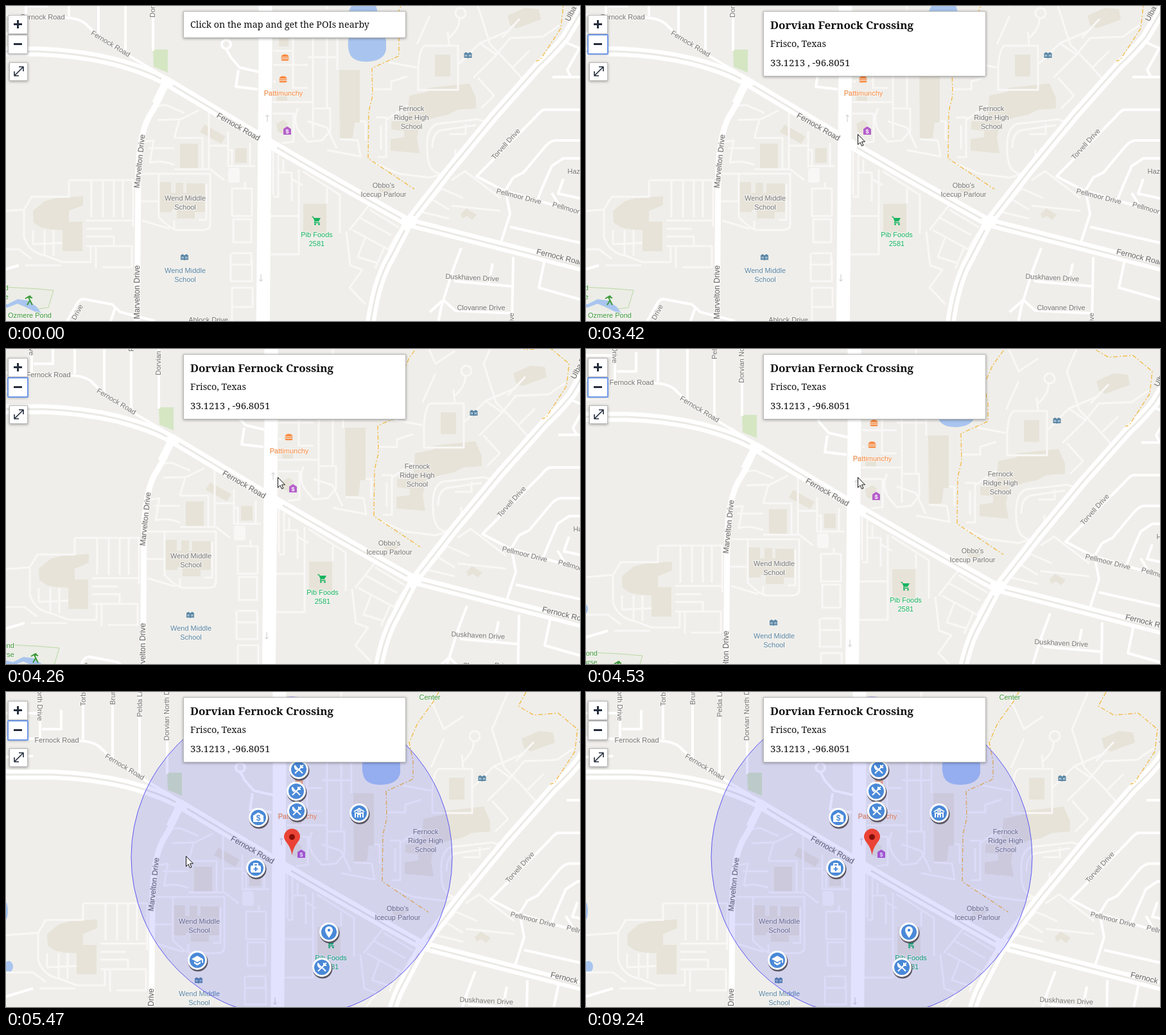
An HTML page for the animation above (9.34 s loop, 894 px wide and 492 px high).

```html
<!DOCTYPE html>
<html lang="en">
<head>
<meta charset="utf-8">
<title>POI map</title>
<style>
html, body { margin: 0; width: 100%; height: 100%; overflow: hidden; background: #efeeea; }
svg { display: block; }
path, circle { stroke-linejoin: round; }
.line { fill: none; }
.service { stroke: #f9f8f7; stroke-width: 3; }
.street { stroke: #fff; stroke-width: 4; }
.avenue { stroke: #fff; stroke-width: 9; }
.dual { stroke: #fff; stroke-width: 15.5; }
.median { stroke: #eae9e5; stroke-width: 2.8; }
.trail { stroke: #f3bc4b; stroke-width: 1.4; stroke-dasharray: 7 3 2 3; }
.building { fill: #e7e3d8; }
.water { fill: #a9c5ef; }
.park { fill: #d5e6c3; }
.label { font: 11px "Liberation Sans", Arial, sans-serif; text-anchor: middle; fill: #777;
  paint-order: stroke; stroke: #f4f3f0; stroke-width: 2.5px; stroke-linejoin: round; }
.big { font-size: 12px; fill: #666; }
.panel { font: 14.25px "Noto Serif", serif; fill: #111; }
.panel .title { font-size: 17px; font-weight: bold; }
.panel .coords { font-size: 15px; }
.box { fill: #fff; stroke: #bbb; filter: drop-shadow(0 1px 2px rgba(0,0,0,.35)); }
.sign { fill: none; stroke: #252d3c; stroke-width: 3; }
.glyph { fill: none; stroke: #fff; stroke-width: 2; }

.anim { animation: 9340ms step-end infinite; }
#map { animation-name: pan; }
#cursor { animation-name: cursor; }
#focus { animation-name: focus; }
#results { animation-name: results; }
#hint { animation-name: hint; }
#details { animation-name: details; }
@keyframes pan {
  0% { transform: translate(0, 0); }
  39.82% { transform: translate(1px, 1px); }
  41.11% { transform: translate(2px, 5px); }
  42.71% { transform: translate(5px, 11px); }
  44% { transform: translate(7px, 17px); }
  45.6% { transform: translate(9px, 23px); }
  46.89% { transform: translate(11px, 29px); }
  48.5% { transform: translate(14px, 35px); }
  49.89% { transform: translate(16px, 40px); }
  51.49% { transform: translate(18px, 45px); }
  52.89% { transform: translate(19px, 50px); }
  54.38% { transform: translate(21px, 54px); }
  55.67% { transform: translate(22px, 56px); }
  56.95%, 100% { transform: translate(22px, 58px); }
}
@keyframes cursor {
  0% { transform: translate(900px, 240px); }
  13.59% { transform: translate(800px, 240px); }
  15.2% { transform: translate(664px, 235px); }
  16.91% { transform: translate(554px, 236px); }
  18.52% { transform: translate(507px, 227px); }
  19.8% { transform: translate(472px, 218px); }
  21.41% { transform: translate(449px, 209px); }
  22.69% { transform: translate(434px, 205px); }
  23.98% { transform: translate(428px, 203px); }
  25.58% { transform: translate(425px, 201px); }
  26.87% { transform: translate(423px, 200px); }
  58.56% { transform: translate(280px, 256px); }
  78.58% { transform: translate(289px, 272px); }
  80.19% { transform: translate(341px, 306px); }
  81.58% { transform: translate(414px, 344px); }
  83.19% { transform: translate(560px, 372px); }
  84.47% { transform: translate(725px, 396px); }
  85.76% { transform: translate(856px, 413px); }
  87.36% { transform: translate(876px, 426px); }
  88.75% { transform: translate(886px, 435px); }
  90.36% { transform: translate(888px, 441px); }
  91.97% { transform: translate(889px, 455px); }
  93.36% { transform: translate(891px, 473px); }
  94.64%, 100% { transform: translate(900px, 500px); }
}
@keyframes focus { 0%, 98.92%, 100% { opacity: 0; } 29.55% { opacity: 1; } }
@keyframes results { 0% { opacity: 0; } 58.56%, 100% { opacity: 1; } }
@keyframes hint { 0% { opacity: 1; } 36.61%, 100% { opacity: 0; } }
@keyframes details { 0% { opacity: 0; } 36.61%, 100% { opacity: 1; } }
</style>
</head>
<body>
<svg width="894" height="492" viewBox="0 0 894 492">
<defs>
  <g id="burger" fill="#fa8a40">
    <path d="M-6,-1Q-5,-5 0,-5T6,-1Z"/><path d="M-6,0H6V1.5H-6ZM-6,2.5H6Q6,5 4,5H-4Q-6,5 -6,2.5Z"/>
  </g>
  <g id="book" fill="#5a86a5">
    <path d="M-6,-3L-3,-5 0,-3 3,-5 6,-3V4H1L0,5 -1,4H-6Z"/>
    <path d="M-4,-1V2M-2,-1V2M2,-1V2M4,-1V2" stroke="#dfe8ee"/>
  </g>
  <g id="disc">
    <circle cx="1" cy="2" r="15.5" fill="#5a5663"/><circle r="15" fill="#fff"/><circle r="12" fill="#4a89d8"/>
  </g>
  <g id="food">
    <use href="#disc"/>
    <path class="glyph" d="M-6,6L3,-3M3,-3L3,-7M3,-3L7,-3M4,-4L7,-7M6,6L-1,-1M-2,-1L-6,-6Q-7,-3 -4,0Z"/>
  </g>
  <path id="arrow" d="M0,6V-5M-2.5,-2L0,-5 2.5,-2" class="line" stroke="#c9c9c9"/>
</defs>

<g id="map" class="anim">
  <rect x="-60" y="-80" width="1020" height="620" fill="#efeeea"/>

  <g class="park">
    <path d="M229,68H252V104L230,95Z"/>
    <path d="M-25,440L40,441 74,444 66,470 35,478 -25,470Z" opacity=".12"/>
  </g>
  <path d="M-25,438L38,441 74,444 66,471 45,474" class="line" stroke="#b9d8a2"/>
  <g class="water">
    <path d="M556,-12Q574,-12 578,6L592,54V68Q589,86 562,87Q540,87 535,74Q531,62 534,48V8Q540,-8 556,-12Z"/>
    <path d="M-25,460L2,466 18,458 34,460 48,470 55,480 44,477 30,470 18,465 2,471 -25,467Z"/>
    <ellipse cx="-18" cy="371" rx="7" ry="9"/><ellipse cx="-23" cy="284" rx="4" ry="14"/>
  </g>

  <g class="building">
    <path d="M519,100H551V182H543L540,206 520,208Z"/>
    <path d="M668,76H692V110H668ZM781,15L808,3 830,5 833,21 795,35 785,30Z"/>
    <path d="M628,140L657,134V128L722,121 732,144V160L704,162 688,170 668,174 645,182 640,206 644,230 599,226V208L620,205V195L600,193V180L625,180Z"/>
    <path d="M271,215H299V254H271ZM357,222H375V245H357ZM309,185L342,204 335,215 302,197Z"/>
    <path d="M238,275H257V292H264V276H276V292H281V277H310V322H294V332H266V318H258V322H238Z"/>
    <path d="M42,320L60,305 78,300 120,297V311L98,320V337H119V383H88V350L70,349 55,346 43,338Z"/>
    <path d="M463,309H499V358H463ZM708,325L717,316 733,326 726,334 718,328 711,332Z"/>
    <path d="M425,47H440V63H425ZM421,141L438,134V150H422ZM421,184L432,178 439,183 432,200 423,196Z"/>
    <path d="M582,279L593,276 604,284 592,295 580,288Z"/>
  </g>

  <g class="line service">
    <path d="M99,272H198V345M133,272V330M151,272V330M168,272V330M182,272V330M125,335H198M125,348H165M125,360H168V375H125M28,318L40,298H98V272M-25,322L28,318V360Q35,385 62,390L88,400H132V375H196V408H150M42,350V372L88,370M60,350V390M74,350V390M30,405H86M140,375V410M-25,380H20L40,395"/>
    <path d="M228,165Q235,153 250,155L278,167M236,178L272,177 300,163M216,212L230,210 224,245M262,255H316V165M262,206H306V255M224,245Q240,240 262,248M262,206L270,178M316,218H346M346,196V250H388M380,214V250M346,225H352V250M222,222H262M318,255L340,272"/>
    <path d="M212,262H318V341Q318,350 305,350H266Q256,348 238,330V262M312,278V334H300M262,335V350M210,305H238M212,335L255,348"/>
    <path d="M352,285H383V328H352ZM354,333H382V369H354ZM352,386H382V404H350V386M350,404V430H383V395M352,440H384V470H352ZM352,470V492M372,275V285"/>
    <path d="M447,50V128H470M416,70H447M416,92H470M478,50V205M500,50V160M416,118H420M470,80H516M516,50V100M415,150H478V128M455,160Q445,180 458,198L470,212 492,210 505,195V160H478M415,168H448V212L430,214M470,180L500,190 515,222M520,208L548,210 552,235 500,225M551,180H560V210"/>
    <path d="M416,224V295M424,232V298H416M424,260H445V305M432,240V260M456,255V388H412M412,328H456M462,258L520,295V355M445,270L462,280M500,285V308"/>
    <path d="M535,350L568,308M530,352L536,405 555,412 535,440 560,466M540,350L595,380 610,355M566,318L612,346M550,330L600,358M560,360L548,392 580,402M590,375L575,410M640,320L690,332M640,330L678,285 712,300M660,300L690,318"/>
    <path d="M642,96V131H704V62H652Q644,66 642,96M704,92L738,58 764,76 728,112M738,58L785,38M690,60L688,40M568,130H600V118L625,110M576,174H592V236H578M584,186V224M592,178L625,155M576,246L612,262 660,268 680,262"/>
    <path d="M656,225Q654,190 672,184L735,177 757,184 706,248Q694,262 675,262Q656,258 656,225ZM664,222Q664,198 678,194L732,186M700,224V242M716,184V200H690M754,60L785,92 806,116M772,50L800,20M762,78L785,50 836,48 862,30M790,95L815,70M735,112L760,140 740,160M596,88L640,96"/>
    <path d="M694,272L715,258 770,300M770,320L694,312M640,-45L660,0 690,-20M690,50Q708,34 706,18M500,-58V5M660,15L640,60M760,-58L735,0 754,60"/>
    <circle cx="708" cy="11" r="8"/>
  </g>

  <g class="line street">
    <path d="M-30,13L90,18Q118,19 128,32Q145,48 175,68L236,104M31,-60V14M64,-30V0H34M98,-60V16M144,-60V44M186,-60V76M229,-60V70M-30,44L20,42M-30,-25H31"/>
    <path d="M343,67L350,80 364,96 394,103M362,100L358,126 392,130"/><circle cx="343" cy="60" r="7"/>
    <path d="M894,162H838Q832,164 824,174L733,266 775,288 910,328M930,210H854Q845,212 836,224L806,260 790,268M790,268L778,288M910,238H868L850,250 836,282 828,302M868,270L860,293 910,304M862,312L850,292M851,111H930M930,62L893,66 874,100 880,111M868,55L893,66"/>
    <path d="M778,288L785,325 770,372M785,345L930,378M709,378L694,418 678,470 672,500M694,415L700,430 790,438M758,402L752,434M790,392L788,500M681,459L700,476 790,480M660,478L680,460M840,392L830,440 900,460"/>
    <path d="M92,498L108,470Q114,456 122,458L165,466 178,478 232,492M170,472L160,500M-30,420L20,405"/>
  </g>

  <path class="line avenue" d="M250,118Q240,146 222,174Q207,205 206,260L204,520"/>
  <path class="line" stroke="#fff" stroke-width="12" d="M251,116L233,152"/>
  <path class="line" stroke="#fff" stroke-width="21" d="M404,-80V90L400,520"/>
  <g class="line dual">
    <path d="M-40,71L50,71Q110,73 165,86Q215,99 250,118L410,214Q510,273 627,338L930,416"/>
    <path d="M915,-25L872,48Q852,73 830,93L760,172 690,257 627,338 598,394Q574,435 566,510"/>
  </g>
  <g class="line median">
    <path d="M-40,71L50,71Q110,73 165,86Q215,99 242,114M260,124L390,202M422,221Q510,273 616,332M638,341L930,416"/>
    <path d="M915,-25L872,48Q852,73 830,93L760,172 690,257 635,328M621,350L598,394Q574,435 566,510"/>
  </g>
  <rect x="346" y="253" width="18" height="23" rx="4" fill="#f8f7f6"/>

  <g class="line trail">
    <path d="M652,-58L643,-42 619,-9 606,21 612,50V78L570,97 571,140 565,165 564,238 636,286"/>
    <path d="M788,-58L776,-36 800,-22 838,-25 868,0 864,35 832,84 826,86"/>
  </g>
  <use href="#arrow" x="407" y="175"/>
  <use href="#arrow" transform="translate(397 425) rotate(180)"/>

  <g class="label">
    <text x="57" y="21">Fernock Road</text>
    <text transform="translate(161 62) rotate(31)">Fernock Road</text>
    <text transform="translate(360 192) rotate(30)" class="big">Fernock Road</text>
    <text transform="translate(862 396) rotate(14)" class="big">Fernock Road</text>
    <text transform="translate(212 243) rotate(-84)" class="big">Marvelton Drive</text>
    <text transform="translate(208 447) rotate(-90)" class="big">Marvelton Drive</text>
    <text transform="translate(883 14) rotate(-63)" class="big" style="text-anchor:start" dx="-12">Ulba Drive</text>
    <text transform="translate(781 218) rotate(-48)">Torvell Drive</text>
    <text transform="translate(798 301) rotate(14)">Pellmoor Drive</text>
    <text transform="translate(885 323) rotate(16)">Pellmoor Drive</text>
    <text transform="translate(726 428) rotate(3)">Duskhaven Drive</text>
    <text x="740" y="475">Clovanne Drive</text>
    <text x="315" y="494">Ablock Drive</text>
    <text transform="translate(110 488) rotate(-62)">Elk Drive</text>
    <text transform="translate(791 492) rotate(-90)">Drive</text>
    <text x="898" y="262">Haz Lane</text>
    <g style="text-anchor:start">
      <text transform="translate(232 18) rotate(-90)">Dorvian North Drive</text>
      <text transform="translate(190 -19) rotate(-90)">Pelda Lane</text>
      <text transform="translate(148 -38) rotate(-90)">Brum Lane</text>
      <text transform="translate(102 -36) rotate(-90)">Torba Lane</text>
    </g>
    <text transform="translate(27 -13) rotate(90)" style="text-anchor:end">North Drive</text>
    <text x="631.5" y="164">Fernock<tspan x="631.5" dy="14">Ridge High</tspan><tspan x="631.5" dy="14">School</tspan></text>
    <text x="279" y="304">Wend Middle<tspan x="279" dy="14">School</tspan></text>
    <text x="588" y="284">Obbo's<tspan x="588" dy="14">Icecup Parlour</tspan></text>
    <text x="279" y="417" fill="#5a86a5">Wend Middle<tspan x="279" dy="14">School</tspan></text>
    <text x="432" y="140" fill="#fa8a40">Pattimunchy</text>
    <text x="484" y="361" fill="#16b45f">Pib Foods<tspan x="484" dy="14">2581</tspan></text>
    <g fill="#3f9a3c">
      <text x="37" y="487">Ozmere Pond</text>
      <text x="638" y="-46">Center</text>
      <text x="4" y="444" style="text-anchor:end">Pond<tspan x="4" dy="14">Course</tspan></text>
    </g>
  </g>

  <use href="#burger" x="434.5" y="80.5"/><use href="#burger" x="431.5" y="114.5"/>
  <use href="#book" x="719.5" y="77"/><use href="#book" x="278" y="392.5"/>
  <path d="M432,192L438,188 444,192V201H432Z" fill="#b55fca"/>
  <text x="438" y="198.5" fill="#fff" text-anchor="middle" font-family="Liberation Sans, sans-serif" font-size="9" font-weight="bold">$</text>
  <g fill="#16b45f">
    <path d="M479,331H490L487,336.5H481Z"/>
    <path d="M476.5,329.5H478.5L481.5,336 480.5,338.5H488.5" class="line" stroke="#16b45f" stroke-width="1.3"/>
    <circle cx="481.5" cy="341" r="1.4"/><circle cx="487.5" cy="341" r="1.4"/>
  </g>
  <path d="M30,457L35,454 41,456M35,455L38,461 41,467M37,460L33,467" class="line" stroke="#3f9a3c" stroke-width="2"/>
  <circle cx="37" cy="454" r="2" fill="#3f9a3c"/>
</g>

<g id="results" class="anim">
  <circle cx="445" cy="258" r="250" fill="#00f" fill-opacity=".115" stroke="#5c55f0"/>
  <use href="#food" x="456" y="121"/><use href="#food" x="452" y="155"/>
  <use href="#food" x="453" y="186"/><use href="#food" x="492" y="430"/>
  <g transform="translate(393 196)">
    <use href="#disc"/><path d="M-8,-3L0,-8 8,-3V7H-8Z" fill="#fff"/>
    <text y="5" fill="#4a89d8" text-anchor="middle" font-family="Liberation Sans, sans-serif" font-size="12" font-weight="bold">$</text>
  </g>
  <g transform="translate(550 189)">
    <use href="#disc"/><path class="glyph" d="M-8,-2L0,-7 8,-2M-6,-1V7M6,-1V7M-2,7V2H2V7M-6,0H6M-3,-3H3"/>
  </g>
  <g transform="translate(389 275)">
    <use href="#disc"/><rect x="-8" y="-4" width="16" height="11" rx="2" fill="#fff"/>
    <path class="glyph" d="M-3,-4V-7H3V-4"/><path d="M0,-2V5M-3.5,1.5H3.5" stroke="#4a89d8" stroke-width="2"/>
  </g>
  <g transform="translate(503 375)">
    <use href="#disc"/><path d="M0,9Q-6,1 -6,-3A6,6 0 0 1 6,-3Q6,1 0,9Z" fill="#fff"/><circle cy="-3" r="2.2" fill="#4a89d8"/>
  </g>
  <g transform="translate(298 419)">
    <use href="#disc"/><path d="M-9,-2L0,-7 9,-2 0,3ZM-5,2L0,5 5,2V5L0,8 -5,5Z" fill="#fff"/><path class="glyph" d="M8,-2V4"/>
  </g>
  <path d="M445.5,255Q444,244 437,235Q433,230 433,226A12.5,12.5 0 0 1 458,226Q458,230 454,235Q447,244 445.5,255Z" fill="#ea4335"/>
  <circle cx="445.5" cy="226.5" r="4.5" fill="#850f0a"/>
</g>

<g class="panel">
  <g id="hint" class="anim">
    <rect class="box" x="276.5" y="8.5" width="346" height="41"/>
    <text x="287" y="34">Click on the map and get the POIs nearby</text>
  </g>
  <g id="details" class="anim">
    <rect class="box" x="276.5" y="8.5" width="346" height="101"/>
    <text class="title" x="287" y="36">Dorvian Fernock Crossing</text>
    <text x="287" y="64">Frisco, Texas</text>
    <text class="coords" x="287" y="94">33.1213 , -96.8051</text>
  </g>
</g>

<rect class="box" x="3.5" y="14.5" width="30" height="29"/>
<rect class="box" x="3.5" y="45.5" width="30" height="29"/>
<rect class="box" x="5.5" y="88.5" width="28" height="28"/>
<rect id="focus" class="anim" x="3" y="45" width="31" height="30" rx="1" fill="none" stroke="#6d97e8" stroke-width="2"/>
<path class="sign" d="M12,28.5H25M18.5,22V35M12,59.5H25"/>
<path class="sign" style="stroke-width:1.6" d="M13,109L27,95M20,95H27V102M13,102V109H20"/>

<g id="cursor" class="anim">
  <path d="M.5,.5V16.5L4,13 6.5,18.5 9,17.5 6.5,12H11.5Z" fill="#fff" stroke="#111"/>
</g>
</svg>
</body>
</html>
```
